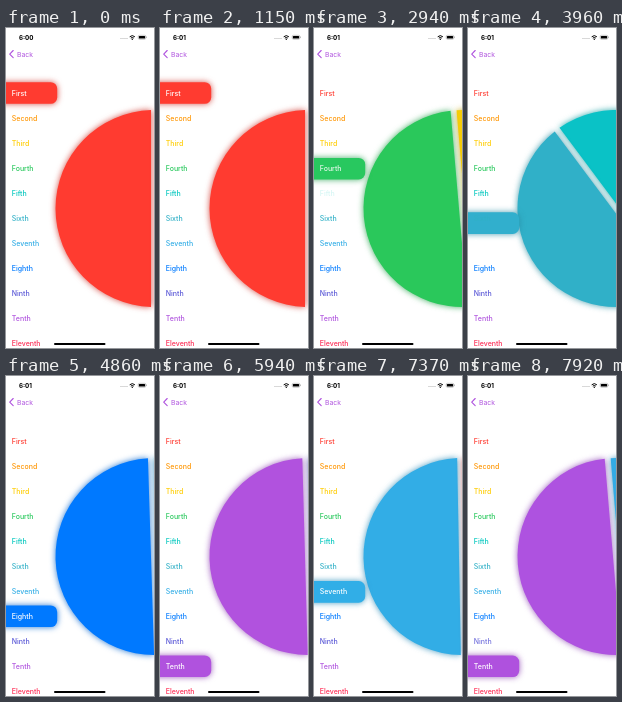
Animation, 148 px wide and 320 px high, one loop 8 s. Source, as an HTML page:

```html
<!DOCTYPE html>
<html lang="en">
<head>
<meta charset="utf-8">
<title>Colour wheel menu</title>
<style>
  html, body { margin: 0; width: 100%; height: 100%; overflow: hidden; background: #fff; }
  svg { display: block; width: 100%; height: 100%; font-family: Inter, "Liberation Sans", sans-serif; }
</style>
</head>
<body>
<svg viewBox="0 0 148 320">
  <defs>
    <filter id="glow" filterUnits="userSpaceOnUse" x="-20" y="0" width="320" height="340" color-interpolation-filters="sRGB">
      <feGaussianBlur in="SourceGraphic" stdDeviation="3.4" result="blur"/>
      <feColorMatrix in="blur" type="matrix" result="shade"
        values=".8 0 0 0 0  0 .8 0 0 0  0 0 .8 0 0  0 0 0 .85 0"/>
      <feMerge><feMergeNode in="shade"/><feMergeNode in="SourceGraphic"/></feMerge>
    </filter>
  </defs>
  <g id="wheel"></g>
  <rect id="tab" x="-12" y="-10.8" width="63.2" height="21.6" rx="6.5" filter="url(#glow)"/>
  <g id="labels" font-size="7" font-weight="500"></g>
  <text id="clock" x="13" y="11.8" font-size="6.2" font-weight="700"></text>
  <g fill="#aaa">
    <circle cx="115" cy="10.5" r=".6"/><circle cx="117" cy="10.5" r=".6"/>
    <circle cx="119" cy="10.5" r=".6"/><circle cx="121" cy="10.5" r=".6"/>
  </g>
  <g fill="none" stroke="#000">
    <path d="M123.7 8.8q2.6-2.4 5.2 0M124.8 10.1q1.5-1.3 3 0" stroke-width="1"/>
    <rect x="132.2" y="7.3" width="7.6" height="4" rx="1.2" stroke="#999" stroke-width=".5"/>
  </g>
  <circle cx="126.3" cy="11.2" r=".7"/>
  <rect x="132.9" y="8" width="6.2" height="2.6" rx=".6"/>
  <path d="M140.5 8.6v1.4" stroke="#999" stroke-width=".6"/>
  <path d="M7.2 22.5 3.7 26.1l3.5 3.6" fill="none" stroke="#af52de" stroke-width="1.1" stroke-linecap="round" stroke-linejoin="round"/>
  <text x="11" y="28.5" font-size="6.8" fill="#af52de">Back</text>
  <rect x="48" y="315" width="51.5" height="1.9" rx=".95"/>
</svg>
<script>
const LOOP = 8000;
const ITEMS = [
  ["First", 255, 59, 48], ["Second", 255, 149, 0], ["Third", 255, 204, 0],
  ["Fourth", 40, 200, 92], ["Fifth", 0, 199, 190], ["Sixth", 48, 176, 199],
  ["Seventh", 50, 173, 230], ["Eighth", 0, 122, 255], ["Ninth", 88, 86, 214],
  ["Tenth", 175, 82, 222], ["Eleventh", 255, 45, 85]
].map(([name, ...color]) => ({ name, color }));

// Each tap: time in ms, selected item index
const TAPS = [
  [-2000, 0], [1710, 1], [2123, 2], [2570, 3], [2916, 4], [3400, 5], [3893, 6],
  [4390, 7], [4890, 8], [5400, 9], [5960, 4], [6515, 0], [6950, 6], [7420, 9], [7904, 8]
];
const CENTER = { x: 148, y: 180.5, radius: 98.5, inset: 3 };
const WHITE = [255, 255, 255];

const $ = id => document.getElementById(id);
const add = (parent, tag, attrs) => {
  const node = document.createElementNS("http://www.w3.org/2000/svg", tag);
  for (const key in attrs) node.setAttribute(key, attrs[key]);
  return parent.appendChild(node);
};
const clamp = v => Math.min(1, Math.max(0, v));
const mix = (a, b, k) => a.map((v, i) => v + (b[i] - v) * k);
const rgb = c => `rgb(${c.map(v => Math.round(Math.min(255, Math.max(0, v))))})`;
const rowY = index => 65 + 25 * index;

// Progress of a damped spring (response .55 s, damping .825)
function spring(ms) {
  if (ms <= 0) return 0;
  const s = ms / 1000, omega = 2 * Math.PI / 0.55, decay = 0.825 * omega;
  const freq = omega * Math.sqrt(1 - 0.825 ** 2);
  return 1 - Math.exp(-decay * s) * (Math.cos(freq * s) + decay / freq * Math.sin(freq * s));
}

const { x, y, radius, inset } = CENTER;
const chord = Math.sqrt(radius ** 2 - inset ** 2);
const halves = [0, 1].map(() => {
  const group = add($("wheel"), "g", { filter: "url(#glow)" });
  return add(group, "path", { d: `M${x - inset} ${y - chord}A${radius} ${radius} 0 0 0 ${x - inset} ${y + chord}Z` });
});
const labels = ITEMS.map((item, i) => {
  const text = add($("labels"), "text", { x: 5.8, y: rowY(i) + 2.5 });
  text.textContent = item.name;
  return text;
});

function draw(t) {
  let angle = 0, tabY = rowY(0), tabColor = ITEMS[0].color;
  const halfColors = [tabColor, tabColor];
  const whiteness = ITEMS.map((_, i) => i === 0 ? 1 : 0);

  for (let n = 1; n < TAPS.length && TAPS[n][0] < t; n++) {
    const [time, index] = TAPS[n], previous = TAPS[n - 1][1];
    const age = t - time, p = spring(age), color = ITEMS[index].color;
    angle -= 180 * p;
    tabY += (rowY(index) - rowY(previous)) * p;
    tabColor = mix(tabColor, color, p);
    halfColors[n % 2] = mix(halfColors[n % 2], color, p);
    whiteness[previous] *= 1 - clamp((age - 20) / 45);
    whiteness[index] = Math.max(whiteness[index], clamp((age - 15) / 12));
  }

  halves.forEach((half, i) => {
    half.setAttribute("transform", `rotate(${angle + 180 * i} ${x} ${y})`);
    half.setAttribute("fill", rgb(halfColors[i]));
  });
  $("tab").setAttribute("y", tabY - 10.8);
  $("tab").setAttribute("fill", rgb(tabColor));
  labels.forEach((label, i) => label.setAttribute("fill", rgb(mix(ITEMS[i].color, WHITE, whiteness[i]))));
  $("clock").textContent = t < 1150 ? "6:00" : "6:01";
}

const start = performance.now();
function tick() {
  draw((performance.now() - start) % LOOP);
  requestAnimationFrame(tick);
}
tick();
</script>
</body>
</html>
```
